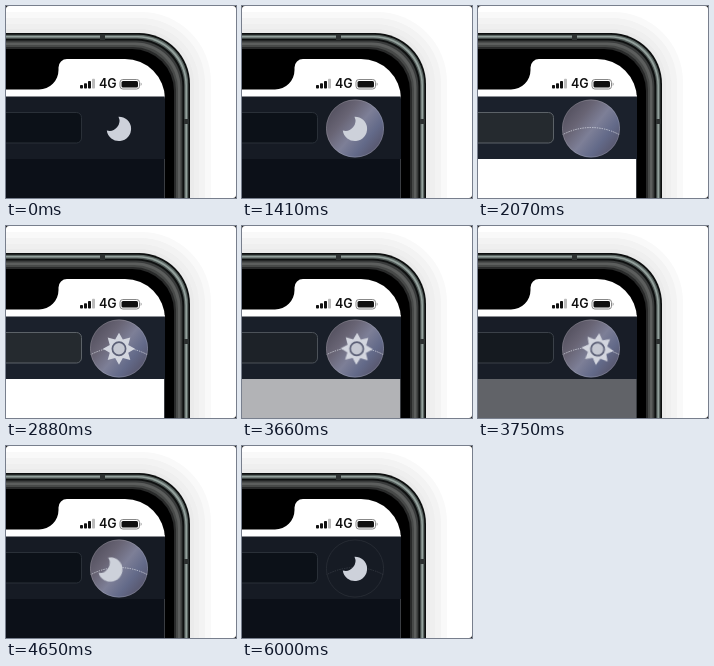
These frames come from a looping animation (230 by 192 pixels, 6.12 s). An HTML page:

```html
<!DOCTYPE html>
<html lang="en">
<head>
<meta charset="utf-8">
<title>Theme switch</title>
<style>
html, body { margin: 0; width: 100%; height: 100%; overflow: hidden; background: #111; }
svg { display: block; width: 230px; height: 192px; }
text { font: 600 12.5px Inter, Roboto, sans-serif; }
.orbit { transform-origin: 113px 182.5px; }
</style>
</head>
<body>
<svg viewBox="0 0 230 192">
  <defs>
    <clipPath id="screen"><rect x="-200" y="53" width="359" height="400" rx="40"/></clipPath>
    <clipPath id="disc"><circle cx="113" cy="122.5" r="29"/></clipPath>
    <linearGradient id="glass" x1="0" y1="0.1" x2="1" y2="0.9">
      <stop offset="0" stop-color="#4c4957"/>
      <stop offset=".3" stop-color="#686474"/>
      <stop offset=".52" stop-color="#7d7f97"/>
      <stop offset=".72" stop-color="#636a89"/>
      <stop offset="1" stop-color="#524d60"/>
    </linearGradient>
  </defs>

  <rect width="230" height="192" rx="3" fill="#fff"/>
  <g id="phone"></g>
  <g fill="#2c3030">
    <rect x="94" y="28.5" width="5" height="5.5"/>
    <rect x="178" y="113" width="5" height="5"/>
  </g>

  <g clip-path="url(#screen)">
    <rect y="53" width="160" height="139" fill="#fff"/>
    <rect id="header" y="90.5" width="160" height="63.5" fill="#161b24"/>
    <rect id="page" y="153" width="160" height="39" fill="#0c1018"/>
    <rect x="158" y="153" width="1" height="39" fill="#3a3d42"/>
    <rect id="field" x="-40" y="106.5" width="115.5" height="30.5" rx="5" fill="#0c1118" stroke="#2a3038"/>
  </g>
  <path d="M0 52H61V53A8.5 8.5 0 0 0 52.5 61.5V64A19.5 19.5 0 0 1 33 83.5H0Z"/>

  <g fill="#111">
    <rect x="74" y="79" width="3" height="3.5" rx=".8"/>
    <rect x="78" y="77.2" width="3" height="5.3" rx=".8"/>
    <rect x="82" y="75" width="3" height="7.5" rx=".8"/>
    <rect x="86" y="72.8" width="3" height="9.7" rx=".8" fill="#bbb"/>
    <text x="93" y="82.3">4G</text>
    <rect x="114" y="73.5" width="19.5" height="9.5" rx="2.8" fill="none" stroke="#888"/>
    <rect x="115.5" y="75" width="16.5" height="6.5" rx="1.5"/>
    <path d="M134.7 76.5Q136.6 78.2 134.7 80Z" fill="#888"/>
  </g>

  <circle id="lens" cx="113" cy="122.5" r="29" fill="url(#glass)"/>
  <circle id="ring" cx="113" cy="122.5" r="28.6" fill="none" stroke="#fff" stroke-width=".8"/>
  <g clip-path="url(#disc)">
    <path id="arc" d="M84 129A60 60 0 0 1 142 129" fill="none" stroke="#dfe2ea" stroke-dasharray="1.4 1"/>
    <g id="sun" class="orbit">
      <polygon id="star" fill="#d3d6df"/>
      <circle cx="113" cy="122.8" r="6.6" fill="#c6c9d3" stroke="#5c6077" stroke-width="1.7"/>
    </g>
    <path id="moon" class="orbit" fill="#cdd1da"
      d="M112.5 110.7A12.2 12.2 0 1 1 100.8 124.5A10 10 0 0 0 112.5 110.7Z"/>
  </g>
</svg>
<script>
const LOOP = 6120;
const $ = id => document.getElementById(id);

// Rounded slabs that run off the stage to the left and below: inset, radius, colour
function slab([inset, r, fill]) {
  const el = document.createElementNS("http://www.w3.org/2000/svg", "rect");
  const set = { x: -200, y: 27 + inset, width: 384 - inset, height: 500, rx: r, fill };
  for (const k in set) el.setAttribute(k, set[k]);
  $("phone").append(el);
}
[
  [-21, 70, "#f9f9f9"], [-15, 65, "#f3f3f3"], [-9, 60, "#efefef"], [-4, 55, "#ebebeb"],
  [0, 51, "#0d0f0f"], [1.7, 50, "#5b6663"], [3, 49, "#93a09c"], [4.6, 48, "#525b59"],
  [5.8, 47, "#0e1010"], [7.6, 46, "#3a3c3c"], [9.5, 45, "#5c5e5d"], [12, 44, "#474948"],
  [14, 43, "#292a2a"], [16, 42, "#000"]
].forEach(slab);

// Eight-pointed sun
$("star").setAttribute("points", Array.from({ length: 16 }, (_, i) => {
  const a = i * Math.PI / 8, r = i % 2 ? 10 : 16;
  return [113 + r * Math.sin(a), 122.8 - r * Math.cos(a)].map(n => n.toFixed(2));
}).join(" "));

// Steps are [time, value, easing to the next step]
function play(id, prop, steps) {
  $(id).animate(
    steps.map(([t, value, easing = "linear"]) => ({ offset: t / LOOP, [prop]: value, easing })),
    { duration: LOOP, iterations: Infinity }
  );
}
const theme = (id, prop, dark, light) => play(id, prop, [
  [0, dark], [1600, dark, "ease"], [2070, light],
  [3550, light, "ease"], [4080, dark], [LOOP, dark]
]);
const turn = deg => `rotate(${deg}deg)`;
const leave = "cubic-bezier(.11, 0, .5, 0)";

theme("page", "fill", "#0c1018", "#ffffff");
theme("header", "fill", "#161b24", "#1b212c");
theme("field", "fill", "#0c1118", "#252a2f");
theme("field", "stroke", "#2a3038", "#5c6268");

play("moon", "transform", [
  [0, turn(0)], [1600, turn(0), leave], [2070, turn(47)], [2070, turn(-47)],
  [4390, turn(-47), "ease"], [4890, turn(0)], [LOOP, turn(0)]
]);
play("sun", "transform", [
  [0, turn(-47)], [2380, turn(-47), "ease"], [2880, turn(0)],
  [3560, turn(0), leave], [4080, turn(47)], [LOOP, turn(47)]
]);
play("lens", "opacity", [[0, 0], [1410, 0], [1410, 1], [5100, 1], [5100, 0], [LOOP, 0]]);
play("ring", "opacity", [[0, 0], [1410, 0], [1410, .2], [5100, .2], [5100, .09], [LOOP, .09]]);
play("arc", "opacity", [
  [0, 0], [1600, 0], [1750, .75], [5230, .75], [5850, .16], [LOOP, .14]
]);
</script>
</body>
</html>
```
